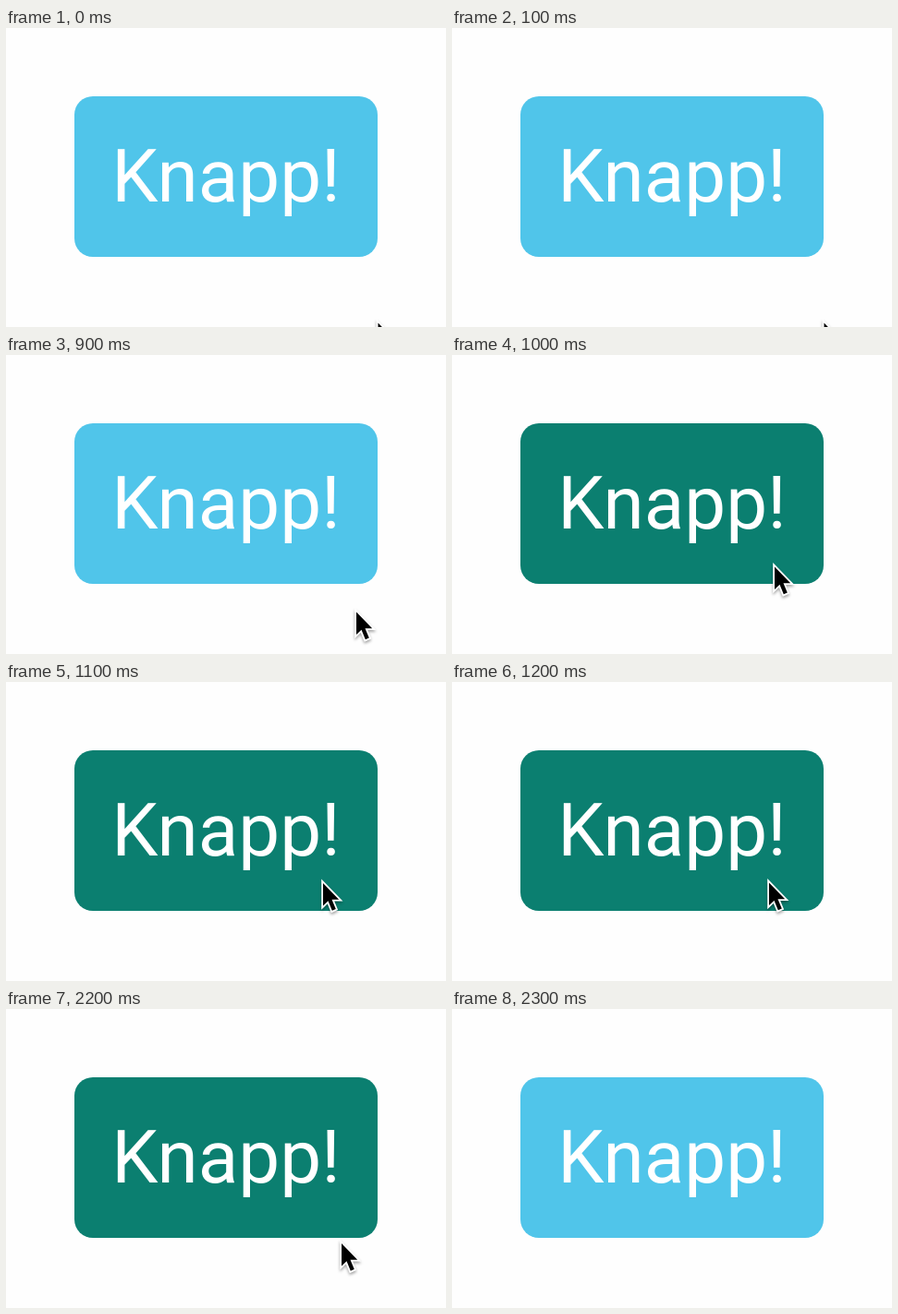
Animation of 476x324 px, one loop 3300 ms. Source, as an HTML page:

```html
<!DOCTYPE html>
<html lang="sv">
<head>
<meta charset="utf-8">
<title>Knapp</title>
<style>
  html, body { margin: 0; width: 100%; height: 100%; overflow: hidden; background: #fefefe; }
  svg { display: block; }
  text { font: 80px Roboto, sans-serif; fill: #fff; text-anchor: middle; }
  #pointer { filter: drop-shadow(0 2px 1.5px rgba(0, 0, 0, .35)); }
</style>
</head>
<body>
<svg width="476" height="324" viewBox="0 0 476 324">
  <rect id="button" x="74" y="74" width="328" height="174" rx="20" fill="#50c5ea"/>
  <text x="238" y="188">Knapp!</text>
  <g id="pointer">
    <path d="M0 0V24.5L5.5 19.3L9.8 29.8L13.8 28.1L9.5 17.8H17.2Z"
          fill="#000" stroke="#fff" stroke-width="3.6" paint-order="stroke"/>
  </g>
</svg>
<script>
  const LOOP = 3300;
  const NORMAL = '#50c5ea', HOVER = '#0b7f70';
  const button = document.getElementById('button');
  const pointer = document.getElementById('pointer');

  // The pointer jumps between these poses without easing.
  const poses = [
    { at: 0, x: 402.5, y: 319.5, color: NORMAL },
    { at: 900, x: 379, y: 278.5, color: NORMAL },
    { at: 1000, x: 349, y: 229.5, color: HOVER },
    { at: 1100, x: 343, y: 218, color: HOVER },
    { at: 1200, x: 343, y: 217.5, color: HOVER },
    { at: 2200, x: 363, y: 254, color: HOVER },
    { at: 2300, color: NORMAL }
  ];

  function draw(now) {
    const time = now % LOOP;
    const pose = poses.findLast(p => p.at <= time);
    const visible = pose.x !== undefined;
    button.setAttribute('fill', pose.color);
    pointer.style.display = visible ? '' : 'none';
    if (visible) pointer.setAttribute('transform', `translate(${pose.x} ${pose.y})`);
  }

  const start = performance.now();
  function tick() {
    draw(performance.now() - start);
    requestAnimationFrame(tick);
  }
  tick();
</script>
</body>
</html>
```
